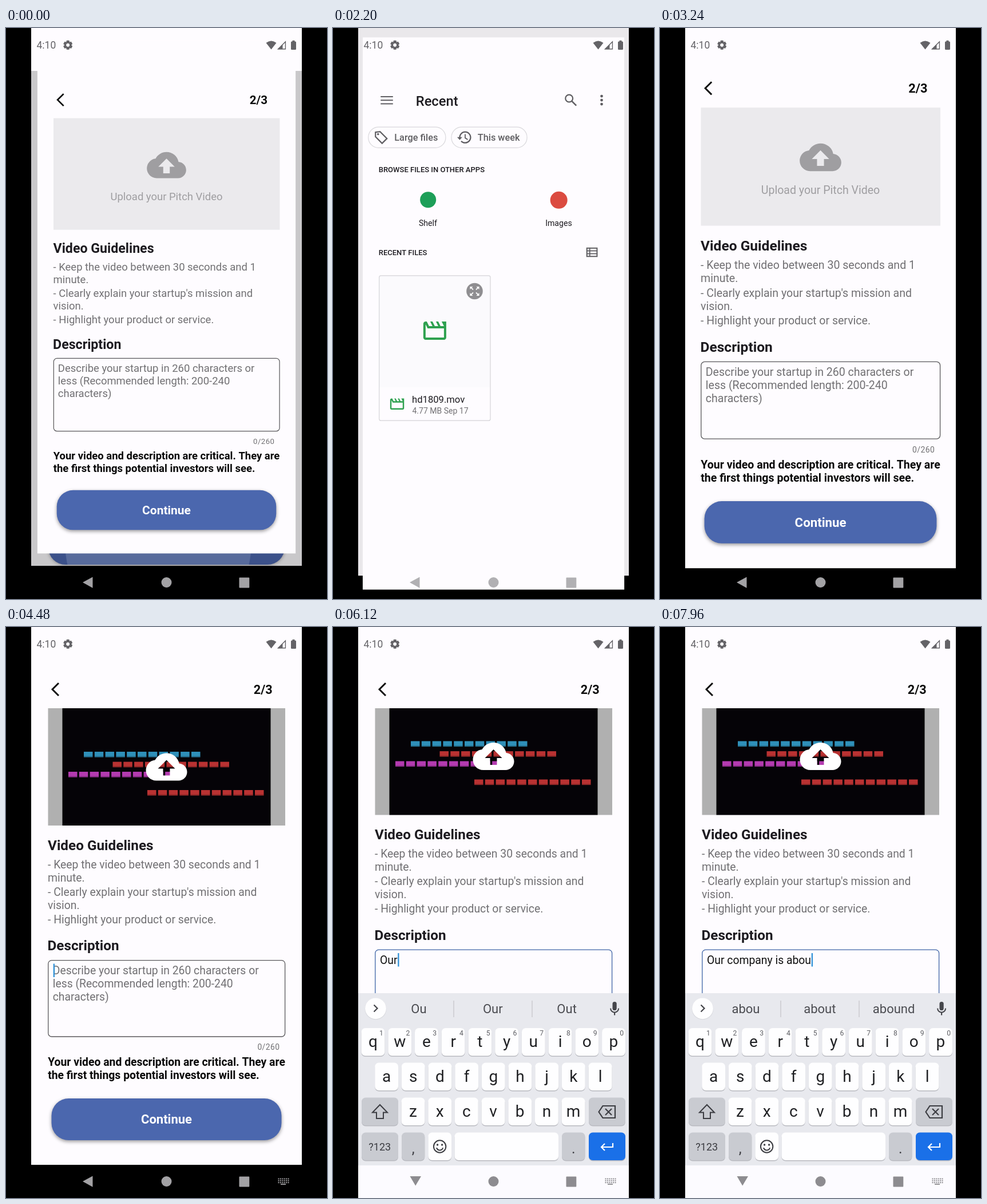
These frames come from a looping animation (561x998 px, 8000 ms). An HTML page with a canvas:

```html
<!DOCTYPE html>
<html lang="en">
<head>
<meta charset="utf-8">
<title>Pitch upload</title>
<style>
html, body { margin: 0; width: 100%; height: 100%; overflow: hidden; background: #000; }
canvas { display: block; width: 100%; height: 100%; }
</style>
</head>
<body>
<canvas id="stage"></canvas>
<script>
const W = 561, H = 998, LOOP = 8000;
const LEFT = 44, RIGHT = 517, CX = 280.5, NAV = 940;
const BG = '#fefcff', INK = '#1d1b20', GREY = '#717073', BLUE = '#4b67ae', ICON = '#5f5e62';

const canvas = document.getElementById('stage');
const dpr = window.devicePixelRatio || 1;
canvas.width = W * dpr;
canvas.height = H * dpr;
const c = canvas.getContext('2d');

const CLOUD = new Path2D('M19.35 10.04A7.49 7.49 0 0 0 12 4C9.11 4 6.6 5.64 5.35 8.04A5.994 5.994 0 0 0 0 14c0 3.31 2.69 6 6 6h13c2.76 0 5-2.24 5-5 0-2.64-2.05-4.78-4.65-4.96zM14 13v4h-4v-4H7l5-5 5 5h-3z');
const CLAP = new Path2D('M4 6.47L5.76 10H20v8H4V6.47M22 4h-4l2 4h-3l-2-4h-2l2 4h-3l-2-4H8l2 4H7L5 4H4c-1.1 0-1.99.9-1.99 2L2 18c0 1.1.9 2 2 2h16c1.1 0 2-.9 2-2V4z');

// Typed text, the moment of each key press, and the word strip after each
const TYPED = 'Our company is abou';
const PRESS = [5320, 5880, 6080, 6220, 6320, 6440, 6560, 6720, 6840, 7040,
  7140, 7240, 7340, 7420, 7520, 7620, 7700, 7780, 7840];
const HINTS = ['||', 'O|Of|On', 'Ou|Our|Out', 'Our|Ours|Out', 'own|first|team', 'c|can|could',
  'co|could|come', 'com|come|coming', 'comp|company|complete', 'compa|company|compare',
  'compan|company|companies', 'company|company\'s|companies', 'is|has|and', 'i|in|is',
  'is|it|in', 'a|the|not', 'a|and|at', 'ab|about|able', 'abo|about|above', 'abou|about|abound'];

const clamp = v => Math.max(0, Math.min(1, v));
const span = (t, a, b) => clamp((t - a) / (b - a));
const easeOut = (v, n) => 1 - (1 - v) ** n;
const typedBy = t => PRESS.filter(p => p <= t).length;

function text(s, x, y, size, color, weight = 400, align = 'left') {
  c.font = `${weight} ${size}px Roboto, sans-serif`;
  c.textAlign = align;
  c.fillStyle = color;
  c.fillText(s, x, y + size * 0.355);
}

function rect(x0, y0, x1, y1, color) {
  c.fillStyle = color;
  c.fillRect(x0, y0, x1 - x0, y1 - y0);
}

function rounded(x0, y0, x1, y1, r) {
  c.beginPath();
  c.roundRect(x0, y0, x1 - x0, y1 - y0, r);
}

function pill(x0, y0, x1, y1, r, color) {
  rounded(x0, y0, x1, y1, r);
  c.fillStyle = color;
  c.fill();
}

function disc(x, y, r, color) {
  c.beginPath();
  c.arc(x, y, r, 0, Math.PI * 2);
  c.fillStyle = color;
  c.fill();
}

function trace(pts, close) {
  c.beginPath();
  for (let i = 0; i < pts.length; i += 2) c.lineTo(pts[i], pts[i + 1]);
  if (close) c.closePath();
}

function line(pts, color, width, close) {
  trace(pts, close);
  c.strokeStyle = color;
  c.lineWidth = width;
  c.stroke();
}

function shape(pts, color) {
  trace(pts, true);
  c.fillStyle = color;
  c.fill();
}

function icon(path, x, y, k, color) {
  c.save();
  c.translate(x, y);
  c.scale(k, k);
  c.fillStyle = color;
  c.fill(path, 'evenodd');
  c.restore();
}

function zoom(s, cy, draw) {
  c.save();
  c.translate(CX, cy);
  c.scale(s, s);
  c.translate(-CX, -cy);
  draw();
  c.restore();
}

function bricks(x, y, color) {
  for (let i = 0; i < 11; i++) {
    const bx = x + i * 18.8;
    rect(bx, y, bx + 15.5, y + 9.6, color);
    rect(bx, y + 7.6, bx + 15.5, y + 9.6, 'rgba(0,0,0,.22)');
  }
}

function thumbnail() {
  rect(73.5, 142, 488, 347, '#b0b0b0');
  rect(98.5, 142, 462.5, 347, '#050307');
  bricks(136, 218, '#2f90b9');
  bricks(186.5, 235.6, '#b93232');
  bricks(109, 253, '#b43bb0');
  bricks(247, 285, '#b93232');
  icon(CLOUD, 244.5, 208.5, 3, '#fff');
}

function button(t) {
  const lift = span(t, 780, 870) * (1 - span(t, 1000, 1300));
  c.save();
  c.shadowColor = 'rgba(0,0,0,.4)';
  c.shadowOffsetY = (2.5 + 2 * lift) * dpr;
  c.shadowBlur = (6 + 4 * lift) * dpr;
  pill(79.5, 824, 481.5, 897, 30, BLUE);
  c.restore();
  const press = span(t, 780, 860) * (1 - span(t, 1100, 1440));
  if (press > 0) {
    c.save();
    rounded(79.5, 824, 481.5, 897, 30);
    c.clip();
    rect(79, 823, 482, 898, `rgba(255,255,255,${0.18 * press})`);
    const r = t < 880 ? 30 + 58.5 * span(t, 780, 880) : 88.5 + 150 * easeOut(span(t, 880, 1140), 2);
    disc(262.5, 868, r, `rgba(255,255,255,${0.24 * press})`);
    c.restore();
  }
  text('Continue', CX, 860.5, 22, '#fff', 700, 'center');
}

function form(t) {
  if (t >= 3760) thumbnail();
  else {
    rect(73.5, 142.5, 488, 347, '#ebeaed');
    icon(CLOUD, 244.5, 192.5, 3, '#9f9ea1');
    text('Upload your Pitch Video', CX, 285.5, 19.35, '#9f9ea1', 400, 'center');
  }
  text('Video Guidelines', 73, 381, 24.3, INK, 700);
  [['- Keep the video between 30 seconds and 1', 415], ['minute.', 438],
   ['- Clearly explain your startup\'s mission and', 463], ['vision.', 486],
   ['- Highlight your product or service.', 511]]
    .forEach(([s, y]) => text(s, 73, y, 19.35, GREY));
  text('Description', 72.5, 556.5, 24.3, INK, 700);

  rounded(73.8, 582.6, 487.6, 716, 6);
  c.strokeStyle = t >= 4520 ? '#3f64a6' : '#59585b';
  c.lineWidth = 1.3;
  c.stroke();
  const typed = TYPED.slice(0, typedBy(t));
  if (typed) text(typed, 82, 600.3, 19.35, '#111');
  else {
    ['Describe your startup in 260 characters or', 'less (Recommended length: 200-240', 'characters)']
      .forEach((s, i) => text(s, 81.7, 600.3 + 22.9 * i, 19.35, GREY));
  }
  if (t >= 4480) {
    c.font = '400 19.35px Roboto, sans-serif';
    const x = 82.7 + c.measureText(typed).width;
    rect(x, 588.5, x + 2.3, 612, '#3091d8');
  }
  c.letterSpacing = '0.46px';
  text('0/260', 439.4, 734.5, 13.8, GREY);
  c.letterSpacing = '0px';
  text('Your video and description are critical. They are', 73.2, 760.5, 19.35, '#080808', 700);
  text('the first things potential investors will see.', 73.2, 783.5, 19.35, '#080808', 700);
  button(t);
}

function page(t) {
  rect(LEFT, 0, RIGHT, NAV, BG);
  line([92, 98, 81, 109, 92, 120], '#0c0c0c', 2.9);
  text('2/3', 432.8, 109, 21.6, '#0c0c0c', 600);
  c.save();
  c.beginPath();
  c.rect(LEFT, 142, RIGHT - LEFT, NAV - 142);
  c.clip();
  c.translate(0, -18.5 * easeOut(span(t, 4620, 4860), 3));
  form(t);
  c.restore();
}

function entering(t) {
  const left = 1 - easeOut(span(t, 0, 300), 3);
  rect(LEFT, 0, RIGHT, NAV, BG);
  if (left > 0) {
    rect(LEFT, 75, RIGHT, NAV, `rgba(0,0,0,${0.21 * left})`);
    c.save();
    c.beginPath();
    c.rect(LEFT, 75, RIGHT - LEFT, NAV - 75);
    c.clip();
    rounded(74, 870, 487, 938, 30);
    c.save();
    c.shadowColor = 'rgba(0,0,0,.4)';
    c.shadowBlur = 6 * dpr;
    c.fillStyle = '#3c518a';
    c.fill();
    c.restore();
    c.clip();
    disc(266, 900, 163, '#586b9c');
    c.restore();
  }
  zoom(1 - 0.0465 * left, 470, () => page(t));
}

function tag(x, y) {
  line([x - 10, y - 9, x - 2, y - 10, x + 10, y + 2, x + 1.5, y + 10.5, x - 10, y - 1], ICON, 2.2, true);
  disc(x - 5.5, y - 5.5, 1.8, ICON);
}

function clock(x, y) {
  c.beginPath();
  c.arc(x + 1.5, y, 9.5, -Math.PI, Math.PI * 0.76);
  c.strokeStyle = ICON;
  c.lineWidth = 2.2;
  c.stroke();
  shape([x - 12.5, y - 0.5, x - 3.5, y - 0.5, x - 8, y + 4.5], ICON);
  line([x + 1.5, y - 5.5, x + 1.5, y + 1, x + 6, y + 3.8], ICON, 1.8);
}

function expand(x, y) {
  disc(x, y, 14.3, '#8f8e91');
  for (const a of [-1, 1]) for (const b of [-1, 1]) {
    line([x + 2.5 * a, y + 2.5 * b, x + 7 * a, y + 7 * b], '#fff', 1.8);
    shape([x + 8 * a, y + 8 * b, x + 3 * a, y + 8 * b, x + 8 * a, y + 3 * b], '#fff');
  }
}

function outline(x0, y0, x1, y1, r, color) {
  rounded(x0, y0, x1, y1, r);
  c.strokeStyle = color;
  c.lineWidth = 1.2;
  c.stroke();
}

function picker() {
  rect(52.2, 17, 508.8, 981, BG);
  for (const y of [120.5, 126.7, 132.9]) rect(83.5, y - 1, 105, y + 1, ICON);
  text('Recent', 145, 128, 23.7, INK, 500);
  c.beginPath();
  c.arc(412.5, 123.5, 6.4, 0, Math.PI * 2);
  c.strokeStyle = ICON;
  c.lineWidth = 2.2;
  c.stroke();
  line([417, 128, 425, 136], ICON, 2.6);
  for (const y of [119.5, 126.5, 133.5]) disc(469.3, y, 2.4, ICON);

  outline(62, 173.5, 197, 209.8, 18, '#d9d8dc');
  outline(207, 173.5, 339, 209.8, 18, '#d9d8dc');
  tag(84.5, 191.5);
  clock(229.5, 191.5);
  text('Large files', 107.5, 191.5, 16.3, ICON, 500);
  text('This week', 252.8, 191.5, 16.3, ICON, 500);

  text('BROWSE FILES IN OTHER APPS', 80, 247.5, 13, INK, 500);
  disc(166.3, 300.5, 14, '#1d9f58');
  disc(394.5, 301, 15, '#db4b40');
  text('Shelf', 166, 341.5, 14.1, INK, 400, 'center');
  text('Images', 394.3, 341.5, 14.1, INK, 400, 'center');

  text('RECENT FILES', 80, 393, 13, INK, 500);
  line([443.5, 384.8, 461.2, 384.8, 461.2, 399.4, 443.5, 399.4], ICON, 2, true);
  line([448.5, 384, 448.5, 400], ICON, 1.8);
  for (const y of [389.6, 394.6]) line([443, y, 462, y], ICON, 1.8);

  rect(81, 433, 275, 628, '#fbfafd');
  outline(81, 433, 275, 686, 3, '#d5d4d8');
  expand(247.5, 460);
  icon(CLAP, 154, 505, 2, '#2ea14f');
  icon(CLAP, 97.6, 642.4, 1.22, '#2ea14f');
  text('hd1809.mov', 138.2, 648.5, 16.6, INK);
  text('4.77 MB Sep 17', 138.6, 669, 14, GREY);
}

function key(x0, y0, x1, color = '#fefeff') {
  pill(x0, y0 + 1.4, x1, y0 + 50, 7, '#b9bac0');
  pill(x0, y0, x1, y0 + 48.6, 7, color);
}

function letters(row, x, y, pitch, caps) {
  [...row].forEach((ch, i) => {
    const kx = x + pitch * i;
    key(kx - 20.4, y, kx + 20.4);
    text(caps ? ch.toUpperCase() : ch, kx, y + 23.3, 28, '#202124', 400, 'center');
  });
}

function strip(t) {
  disc(74.5, 667.5, 18.8, '#d5d6db');
  disc(74.5, 666.8, 18.4, '#fefeff');
  line([71.5, 660.5, 77.5, 666.5, 71.5, 672.5], '#45464b', 2.2);
  for (const x of [211, 348]) rect(x - 0.6, 653, x + 0.6, 682, '#c3c4c9');
  HINTS[typedBy(t - 80)].split('|')
    .forEach((w, i) => text(w, 150 + 129.3 * i, 667.5, 22, '#4b4c51', 400, 'center'));
  pill(488.5, 655, 495.7, 670, 3.6, '#45464b');
  c.beginPath();
  c.arc(492.1, 666.5, 7, 0, Math.PI);
  c.strokeStyle = '#45464b';
  c.lineWidth = 2;
  c.stroke();
  rect(491, 673, 493.2, 678.5, '#45464b');
}

function smile(x, y) {
  c.strokeStyle = '#3c3d42';
  c.lineWidth = 2;
  c.beginPath();
  c.arc(x, y, 10.7, 0, Math.PI * 2);
  c.stroke();
  disc(x - 4, y - 3, 1.7, '#3c3d42');
  disc(x + 4, y - 3, 1.7, '#3c3d42');
  c.beginPath();
  c.arc(x, y + 1, 5.6, 0.2, Math.PI - 0.2);
  c.stroke();
}

function keyboard(t) {
  const dim = '#c9cbd1', dark = '#3c3d42', caps = t < 5400;
  rect(LEFT, 640, RIGHT, NAV + 1, '#e8e9ee');
  rect(LEFT, NAV + 1, RIGHT, H, '#fcfbff');
  strip(t);
  letters('qwertyuiop', 70, 701, 46.72, caps);
  [...'1234567890'].forEach((n, i) => text(n, 84.3 + 46.72 * i, 710, 12.2, '#5d5e63', 400, 'center'));
  letters('asdfghjkl', 93.6, 761.5, 46.68, caps);
  letters('zxcvbnm', 140, 822.5, 46.68, caps);

  key(50, 822.5, 114, dim);
  const arrow = [82, 835, 95, 848.5, 88, 848.5, 88, 859, 76, 859, 76, 848.5, 69, 848.5];
  if (caps) shape(arrow, dark);
  line(arrow, dark, 2, true);
  key(447, 822.5, 511, dim);
  line([464.5, 847.5, 471.5, 837, 493, 837, 493, 858, 471.5, 858], dark, 2.2, true);
  line([476, 842, 487, 853], dark, 2.2);
  line([487, 842, 476, 853], dark, 2.2);

  key(50, 883.5, 114, dim);
  text('?123', 81.7, 908.5, 18, dark, 400, 'center');
  key(120, 883.5, 160.3, dim);
  text(',', 140.3, 911, 25, dark, 400, 'center');
  key(166.3, 883.5, 207);
  smile(186.6, 908);
  key(212.5, 883.5, 394);
  key(400, 883.5, 440.5, dim);
  text('.', 420.3, 911, 25, dark, 400, 'center');
  key(447, 883.5, 511, '#1a70e8');
  line([489, 902, 489, 909, 469, 909], '#fff', 2.2);
  line([475, 903, 469, 909, 475, 915], '#fff', 2.2);
}

function statusBar() {
  const col = '#646367';
  text('4:10', 53.5, 30.2, 17.5, col);
  c.save();
  c.translate(108.2, 29.8);
  for (let i = 0; i < 6; i++) {
    pill(-2.6, -8, 2.6, -3, 1, col);
    c.rotate(Math.PI / 3);
  }
  c.beginPath();
  c.arc(0, 0, 4.6, 0, Math.PI * 2);
  c.strokeStyle = col;
  c.lineWidth = 3.4;
  c.stroke();
  disc(0, 0, 2.8, BG);
  c.restore();
  c.beginPath();
  c.moveTo(463.5, 37.5);
  c.lineTo(454.5, 26);
  c.quadraticCurveTo(463.5, 18.8, 472.5, 26);
  c.fillStyle = col;
  c.fill();
  line([475.5, 36.8, 488.4, 36.8, 488.4, 23.9], col, 1.4, true);
  shape([475, 37.3, 483.5, 37.3, 483.5, 28.8], col);
  pill(498, 23.6, 507, 38, 1.5, col);
  rect(500.5, 21.8, 504.5, 24, col);
}

function navIcons(t, col) {
  if (t >= 4560) shape([134.5, 960, 154, 960, 144.2, 976.5], col);
  else shape([134, 969, 151.5, 959.5, 151.5, 978.8], col);
  disc(280.5, 969, 9, col);
  pill(407.5, 960.5, 425.3, 978.5, 1, col);
  if (t < 4480) return;
  for (let r = 0; r < 3; r++) for (let i = 0; i < 6; i++) {
    const x = 475.5 + 3.4 * i, y = 963.5 + 3.3 * r;
    rect(x, y, x + 2, y + 2, col);
  }
  rect(480, 973, 489, 974.8, col);
}

function frame(t) {
  c.setTransform(dpr, 0, 0, dpr, 0, 0);
  rect(0, 0, W, H, '#000');
  c.save();
  c.beginPath();
  c.rect(LEFT, 0, RIGHT - LEFT, H);
  c.clip();

  const open = easeOut(span(t, 2070, 2570), 5);
  const shut = easeOut(span(t, 3100, 3600), 5);
  const alpha = span(t, 2075, 2150) * (1 - span(t, 3135, 3200));
  if (t < 300) entering(t);
  else zoom(1 + 0.05 * (open - shut), 499, () => page(t));

  if (alpha > 0) {
    if (shut === 0) rect(LEFT, 0, RIGHT, H, `rgba(0,0,0,${0.1 * open})`);
    c.globalAlpha = alpha;
    const size = 0.85 + 0.15 * (open - shut);
    zoom(size / 0.966, 499, picker);
    c.globalAlpha = 1;
  }

  const rise = easeOut(span(t, 4540, 4840), 3);
  if (rise > 0) {
    c.save();
    c.translate(0, 358 * (1 - rise));
    keyboard(t);
    c.restore();
  }
  statusBar();
  navIcons(t, rise > 0.2 ? '#8d8c90' : alpha > 0.5 ? '#b1b0b3' : '#a3a2a5');
  c.restore();
}

function tick() {
  frame(performance.now() % LOOP);
  requestAnimationFrame(tick);
}
tick();
</script>
</body>
</html>
```
